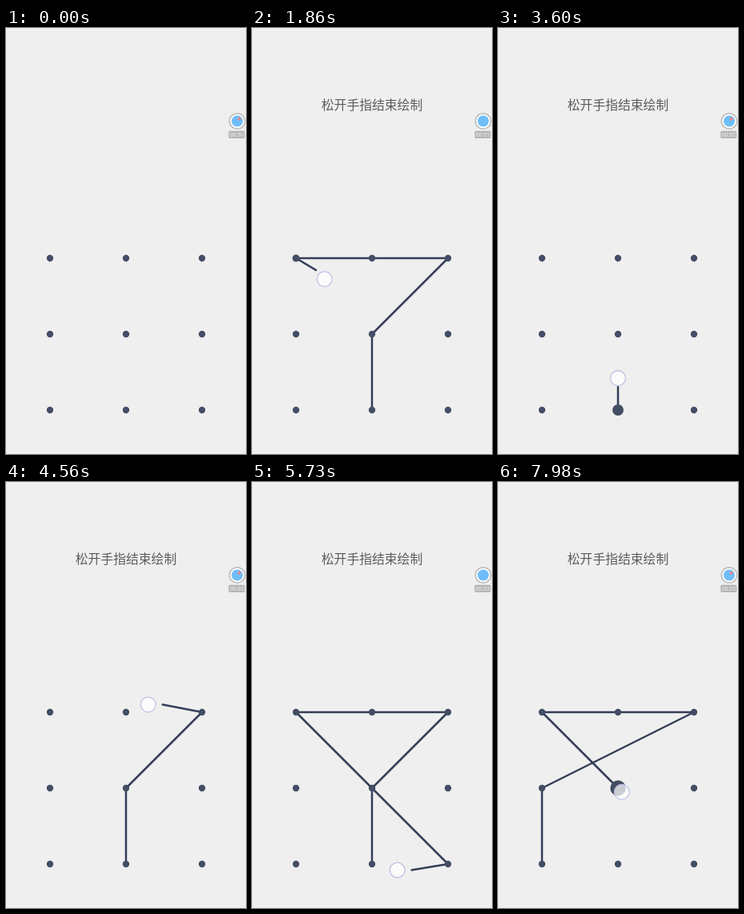
Write an HTML page that moves like this. It is 300 px wide and 533 px high and loops after 8000 ms.

```html
<!DOCTYPE html>
<html lang="zh">
<head>
<meta charset="utf-8">
<title>Pattern lock</title>
<style>
  html, body { margin: 0; width: 100%; height: 100%; overflow: hidden; background: #efefef; }
  svg { display: block; width: 100%; height: 100%; }
  #dots { fill: #434d64; }
  #trail { fill: none; stroke: #343e57; stroke-width: 2.5; stroke-linejoin: round; stroke-linecap: round; }
  #finger { fill: rgba(255, 255, 255, .72); stroke: #bdc2e5; stroke-width: 1.3; }
  #hint { font: 15.8px "Noto Sans CJK SC", "Noto Sans CJK", sans-serif; fill: #5c5c5c; text-anchor: middle; }
  #clock { font: 7px Roboto, sans-serif; fill: #f4f4f4; text-anchor: middle; }
</style>
</head>
<body>
<svg viewBox="0 0 300 533">
  <text id="hint" x="150" y="101.5">松开手指结束绘制</text>
  <polyline id="trail"/>
  <g id="dots"></g>
  <circle id="finger" r="9.4"/>
  <circle cx="289" cy="116.5" r="9.7" fill="#fff" stroke="#c0c0c0" stroke-width="1.8"/>
  <circle cx="289" cy="116.5" r="7" fill="#6fbdf8"/>
  <circle id="blink" cx="291.7" cy="113.7" r="2" fill="#ee8585"/>
  <rect x="278.3" y="128.7" width="20" height="9.3" rx="1.5" fill="#b5b5b5"/>
  <text id="clock" x="288.4" y="135.9"></text>
</svg>
<script>
const LOOP = 8000, LAG = 40, REACH = 28, PULSE = 165;
const DOT_R = 4.2, PULSE_R = 10;
const SECOND = 1640, BLINK = 2020;
const $ = id => document.getElementById(id);
const grid = (col, row) => [55 + 95 * col, 288 + 95 * row];

const dots = Array.from({ length: 9 }, (_, i) => {
  const [x, y] = grid(i % 3, Math.floor(i / 3));
  const el = document.createElementNS("http://www.w3.org/2000/svg", "circle");
  el.setAttribute("cx", x);
  el.setAttribute("cy", y);
  $("dots").append(el);
  return { x, y, el };
});

// Corners of the finger's path in grid units
const fan = [[1, 2.05], [1, 1], [2.08, -.1], [.02, -.1], [2.08, 2.08], [0, 2.08]];
const hook = [[0, 2], [0, 1.15], [2, .15], [0, -.05], [1.05, 1.05]];

const strokes = [
  { corners: fan, times: [30, 470, 950, 1650, 2450, 3150], release: 3180 },
  { corners: fan, times: [3350, 3890, 4300, 4920, 5480, 6100], release: 6150 },
  { corners: hook, times: [6340, 6620, 7050, 7570, 7880], release: LOOP },
];

// Each straight run between corners eases in and out
function position({ corners, times }, t) {
  const next = times.findIndex(v => v > t);
  if (next === 0) return grid(...corners[0]);
  if (next < 0) return grid(...corners[corners.length - 1]);
  const from = grid(...corners[next - 1]), to = grid(...corners[next]);
  const u = (t - times[next - 1]) / (times[next] - times[next - 1]);
  const ease = u * u * (3 - 2 * u);
  return from.map((v, k) => v + (to[k] - v) * ease);
}

for (const s of strokes) {
  s.start = s.times[0];
  s.hits = [];
  for (let t = s.start; t < s.release; t += 5) {
    const [x, y] = position(s, t - LAG);
    const dot = dots.find(d => Math.hypot(d.x - x, d.y - y) < REACH);
    if (dot && !s.hits.some(h => h.dot === dot)) s.hits.push({ dot, t });
  }
}

const show = (el, on) => el.setAttribute("visibility", on ? "visible" : "hidden");

function draw(t) {
  const stroke = strokes.filter(s => s.start <= t).pop();
  const down = !!stroke && t < stroke.release;
  const hits = stroke ? stroke.hits.filter(h => h.t <= t) : [];
  const points = hits.map(h => [h.dot.x, h.dot.y]);
  if (down) {
    points.push(position(stroke, t - LAG));
    const [x, y] = position(stroke, t);
    $("finger").setAttribute("cx", x);
    $("finger").setAttribute("cy", y);
  }
  $("trail").setAttribute("points", points.join(" "));
  for (const d of dots) {
    const hit = hits.find(h => h.dot === d);
    const swell = hit ? Math.max(0, 1 - Math.abs((t - hit.t) / PULSE - 1)) : 0;
    d.el.setAttribute("r", DOT_R + (PULSE_R - DOT_R) * swell);
  }
  show($("finger"), down);
  show($("hint"), down);
  show($("blink"), Math.floor((t + 1220) / BLINK) % 2 === 0);
  $("clock").textContent = "00:0" + Math.floor((t + 690) / SECOND);
}

const begin = performance.now();
function tick() {
  draw((performance.now() - begin) % LOOP);
  requestAnimationFrame(tick);
}
tick();
</script>
</body>
</html>
```
